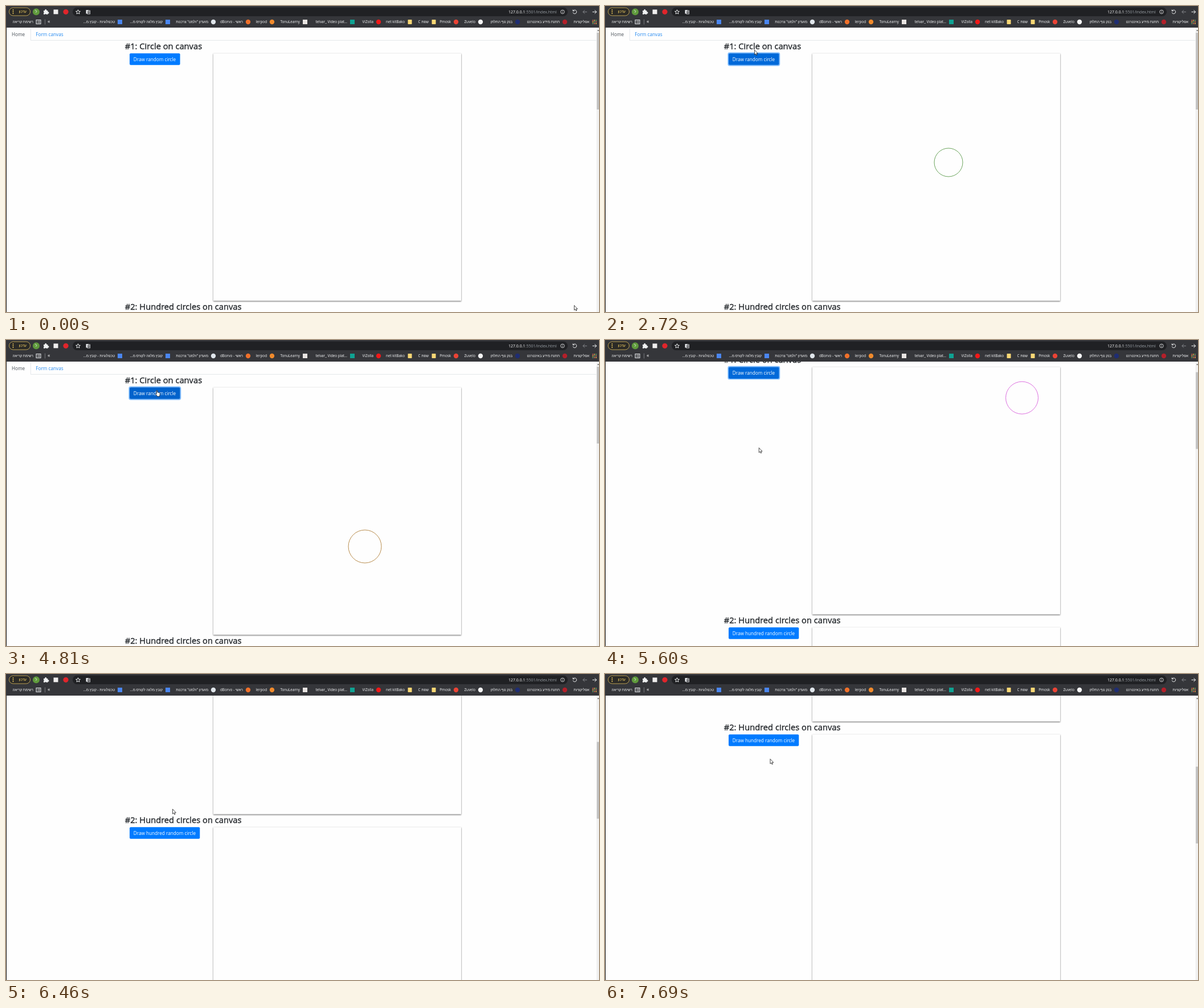
These frames come from a looping animation (1041x538 px, 8000 ms). An HTML page:

```html
<!DOCTYPE html>
<html lang="en">
<head>
<meta charset="utf-8">
<title>Circle on canvas</title>
<style>
  html, body { margin: 0; width: 100%; height: 100%; overflow: hidden; background: #fefefe; }
  svg { display: block; width: 100vw; height: 100vh; }
  text { font-family: 'Open Sans', 'Liberation Sans', sans-serif; white-space: pre; }
  .body { font-size: 8.2px; }
  .small { font-size: 6.3px; fill: #f8f9fa; }
  .heading { font-size: 14.7px; fill: #212529; stroke: #212529; stroke-width: .35; }
  .sheet { fill: #fefefe; filter: drop-shadow(0 1px .9px rgba(0, 0, 0, .62)); }
  .line { fill: none; stroke: #f1f3f4; stroke-width: 1; }
  .thin { stroke-width: .8; }
  .dim { stroke: #85878b; }
  .pointer { fill: #fff; stroke: #111; stroke-width: .75; stroke-linejoin: round; }
</style>
</head>
<body>
<svg id="stage" viewBox="0 0 1041 538" xmlns="http://www.w3.org/2000/svg"></svg>
<script>
const LOOP = 8000;
const REFRESH = 78;
const NOTCH = 54.35;
const GLIDE = 120;
const BLUE = '#007bff';

// Each move takes the pointer from where it rests to a new place;
// a move with a circle includes a click on the button.
const entry = { x: 997, y: 526 };
const moves = [
  { start: 370, end: 540, x: 850, y: 368 },
  { start: 770, end: 1070, x: 520, y: 101 },
  { start: 1240, end: 1640, x: 248, y: 85 },
  { start: 1800, end: 1860, x: 255, y: 93 },
  { start: 2040, end: 2260, x: 262, y: 74, circle: { cx: 603, cy: 275, r: 25, stroke: '#5b9a4a' } },
  { start: 2640, end: 3180, x: 262, y: 87, circle: { cx: 575, cy: 410, r: 28, stroke: '#4a6fc4' } },
  { start: 3500, end: 3640, x: 262, y: 87, circle: { cx: 423.5, cy: 306.7, r: 22.5, stroke: '#c9387f' } },
  { start: 3790, end: 4570, x: 262, y: 87, circle: { cx: 630, cy: 363, r: 29, stroke: '#b0803a' } },
  { start: 4650, end: 5120, x: 262, y: 88, circle: { cx: 732, cy: 137.5, r: 28.5, stroke: '#d95fdc' } },
  { start: 5290, end: 5910, x: 273, y: 231 },
  { start: 6140, end: 6540, x: 293, y: 237.5 },
  { start: 6770, end: 7010, x: 294.5, y: 239 },
  { start: 7150, end: 7690, x: 289.5, y: 149 },
];

// Times at which the wheel turns by one notch
const wheel = [5527, 5620, 5700, 5780, 6170, 6820, 7111, 7350];

// Bookmarks: label, right edge of the label, icon kind, icon colour
const bookmarks = [
  ['רשימת קריאה', 48, 'list', '#e8eaed'],
  ['טכנולוגיות - קובץ מ...', 191, 'square', '#4a86f0'],
  ['קובץ מלווה לקורס מ...', 275, 'square', '#4a86f0'],
  ['מועדון "זלמט" צרכנות', 355, 'circle', '#dfe5ea'],
  ['dBorvo - ראשי', 416, 'circle', '#f0702a'],
  ['lerpod', 458, 'circle', '#f08a2c'],
  ['TonuLearny', 516, 'square', '#e8e4e2'],
  ['telvar_ Video plat...', 599, 'square', '#0fa292'],
  ['ViZolla', 645, 'circle', '#f01818'],
  ['net kitBako', 700, 'folder', '#f8d775'],
  ['שפת C', 742, 'folder', '#f8d775'],
  ['Pmosk', 781, 'circle', '#ea4335'],
  ['Zuvelo', 824, 'circle', '#f4f4f4'],
  ['בנק נוף התלתן', 889, 'circle', '#1f2d73'],
  ['תחנת מידע באינטרנט', 972, 'circle', '#b3202a'],
  ['אפליקציות', 1024, 'apps'],
];

const rect = (x, y, w, h, fill, more = '') =>
  `<rect x="${x}" y="${y}" width="${w}" height="${h}" fill="${fill}" ${more}/>`;
const disc = (x, y, r, fill) => `<circle cx="${x}" cy="${y}" r="${r}" fill="${fill}"/>`;
const path = (d, more = 'class="line"') => `<path d="${d}" ${more}/>`;
const text = (x, y, cls, label, more = '') => `<text x="${x}" y="${y}" class="${cls}" ${more}>${label}</text>`;
const repeat = (count, draw) => Array.from({ length: count }, (_, i) => draw(i)).join('');

const icons = {
  circle: (x, color) => disc(x, 28, 4.2, color),
  square: (x, color) => rect(x - 4, 24, 8, 8, color),
  folder: (x, color) => rect(x - 3.5, 24, 7, 8, color, 'rx=".8"'),
  list: (x, color) => rect(x - 4, 24.5, 8, 7, 'none', `stroke="${color}"`) +
    repeat(3, i => path(`M${x - 2.5} ${26.3 + i * 1.7}h1m1 0h3`, 'class="line thin"')),
  apps: x => repeat(9, i => {
    const row = Math.floor(i / 3), col = i % 3;
    const tint = ['#ea6a5e', '#f5b84a', '#63b36f'][(row + col) % 3];
    return rect(x - 3.6 + col * 2.8, 24.4 + row * 2.8, 1.8, 1.8, tint);
  }),
};

function bookmark([label, right, kind, color]) {
  const flow = /^[א-ת]/.test(label) ? 'direction="rtl"' : 'direction="ltr" text-anchor="end"';
  return text(right, 30, 'small', label, flow) + icons[kind](right + 9, color);
}

const browser = () => rect(0, 0, 1041, 38, '#35363a') +
  rect(117, 2.5, 869, 15.5, '#202124', 'rx="7.7"') +
  rect(5.5, 3, 37, 14, '#2b2a26', 'rx="7" stroke="#c9ab55" stroke-width=".9"') +
  repeat(3, i => disc(12.5, 7 + i * 3, .9, '#fdd663')) +
  text(36, 12.4, 'small', 'עדכון', 'direction="rtl" style="fill:#fdd663"') +
  disc(53, 10.3, 6, '#5f9a3c') + text(53, 12.4, 'small', 'ל', 'text-anchor="middle"') +
  path('M66 8h2.2a1.6 1.6 0 1 1 3 0h2.2v2.4a1.5 1.5 0 1 1 0 2.8v1.6h-2.5a1.4 1.4 0 0 0-2.6 0H66v-2.4a1.5 1.5 0 0 0 0-2.4z', 'fill="#f1f3f4"') +
  rect(83.5, 6.3, 8, 8, '#f0eeee') + disc(105, 10.3, 4.6, '#e0252b') +
  path('M126.5 6.6l1.1 2.6 2.8.2-2.1 1.9.6 2.7-2.4-1.5-2.4 1.5.6-2.7-2.1-1.9 2.8-.2z') +
  rect(140.5, 7, 4.5, 6.5, '#e8eaed') + rect(143, 8, 4.5, 6, '#35363a', 'stroke="#e8eaed" stroke-width=".8"') +
  path('M144 10h2.5m-1.2 0v2.5', 'class="line thin"') +
  text(882, 12.8, '', '127.0.0.1<tspan fill="#9aa0a6">:5501/index.html</tspan>', 'font-size="7" fill="#fff"') +
  '<circle cx="977" cy="10.3" r="3.3" class="line thin"/>' +
  path('M977 9.8v2.3m0-4v.9', 'class="line thin"') +
  path('M995.8 8.2a3.3 3.3 0 1 1-.6 3.1M995.2 6.4v2.4h2.5') +
  path('M1020 10.4h-7m3-3.2l-3.2 3.2 3.2 3.2', 'class="line dim"') +
  path('M1029.5 10.4h7m-3-3.2l3.2 3.2-3.2 3.2') +
  path('M68.5 23.5v9', 'class="line thin dim"') +
  text(73, 30.3, '', '«', 'font-size="9" fill="#fff"') +
  bookmarks.map(bookmark).join('');

// A heading, a button and a drawing sheet, all placed from the sheet's top edge
const section = (top, title, label, width, id) =>
  text(208.7, top - 7.3, 'heading', title) +
  rect(217, top, width, 20.5, BLUE, `id="${id}" rx="2"`) +
  text(223.8, top + 13.5, 'body', label, 'fill="#fff"') +
  rect(364, top, 435, 435, '', 'class="sheet"');

const page = () =>
  path('M43.3 39v21.4H1036.5', 'fill="none" stroke="#dee2e6" stroke-width=".8"') +
  text(10, 53, 'body', 'Home', 'fill="#495057"') +
  text(52.3, 53, 'body', 'Form canvas', 'fill="#2288f0"') +
  rect(216.2, 82.4, 90.2, 22.2, 'none', 'id="ring" rx="2.6" stroke="#80bdff" stroke-width="1.7"') +
  section(83.3, '#1: Circle on canvas', 'Draw random circle', 88.6, 'button') +
  section(541, '#2: Hundred circles on canvas', 'Draw hundred random circle', 123.3, 'hundred') +
  '<circle id="circle" fill="none" stroke-width=".9"/>';

document.getElementById('stage').innerHTML =
  rect(0, 0, 1041, 538, '#fefefe') +
  `<g id="page">${page()}</g>` +
  rect(0, 38, 1, 500, '#111') +
  rect(1036.6, 38, 4.4, 500, '#f1f1f1') +
  path('M1038.2 44l1.6-2.2 1.2 2.2z', 'fill="#505050"') +
  rect(1037.2, 47, 3.8, 135, '#c1c1c1', 'id="thumb"') +
  browser() +
  '<g id="pointer" class="pointer">' +
  path('M.5.4V8.8L2.4 7.1 3.7 9.9 5 9.3 3.8 6.6H6.3Z', 'id="arrow"') +
  path('M2.2 7.6V1.3Q3 .1 3.8 1.3V4.6Q4.7 4 5.3 4.9 6.2 4.4 6.8 5.2 8 4.9 8.2 6V8.6Q8 10 7.3 11.6H3.6Q2.6 10 .6 7.6.5 6.4 2.2 7.6Z', 'id="hand"') +
  '</g>';

const el = Object.fromEntries(['page', 'ring', 'button', 'circle', 'thumb', 'pointer', 'arrow', 'hand']
  .map(id => [id, document.getElementById(id)]));

function set(node, attributes) {
  for (const name in attributes) node.setAttribute(name, attributes[name]);
}
const show = (node, visible) => set(node, { visibility: visible ? 'visible' : 'hidden' });

const clamp = k => Math.min(1, Math.max(0, k));
const smooth = k => k * k * (3 - 2 * k);
const mix = (a, b, k) => a + (b - a) * k;
const clickTime = move => (move.start + move.end) / 2;

// The screen refreshes in even steps while the pointer moves and rests in between.
function refreshTime(t, { start, end }) {
  const steps = Math.max(1, Math.round((end - start) / REFRESH));
  const step = (end - start) / steps;
  return Math.min(end, start + Math.floor((t - start) / step + 1e-6) * step);
}

function update(time) {
  const index = moves.findLastIndex(move => move.start <= time);
  const move = moves[Math.max(0, index)];
  const from = moves[index - 1] || entry;
  const t = index < 0 ? 0 : refreshTime(time, move);

  const k = Math.sin(clamp((t - move.start) / (move.end - move.start)) * Math.PI / 2);
  const x = mix(from.x, move.x, k);
  const y = mix(from.y, move.y, k);
  const scroll = NOTCH * wheel.reduce((sum, turn) => sum + smooth(clamp((t - turn) / GLIDE)), 0);

  set(el.page, { transform: `translate(0 ${-scroll})` });
  set(el.thumb, { y: 47 + scroll * .2665 });
  set(el.pointer, { transform: `translate(${x} ${y})` });
  show(el.pointer, index >= 0);

  const over = x > 214 && x < 303 && y + scroll > 80 && y + scroll < 104;
  show(el.hand, over);
  show(el.arrow, !over);

  const clicks = moves.filter(m => m.circle);
  const focused = t >= clicks[0].start;
  const pressed = clicks.some(m => Math.abs(t - clickTime(m)) < 110);
  set(el.button, { fill: pressed ? '#0062cc' : over || focused ? '#0069d9' : BLUE });
  show(el.ring, focused);

  const last = clicks.findLast(m => clickTime(m) <= t);
  show(el.circle, last);
  if (last) set(el.circle, last.circle);
}

const began = performance.now();
function tick() {
  update((performance.now() - began) % LOOP);
  requestAnimationFrame(tick);
}
tick();
</script>
</body>
</html>
```
